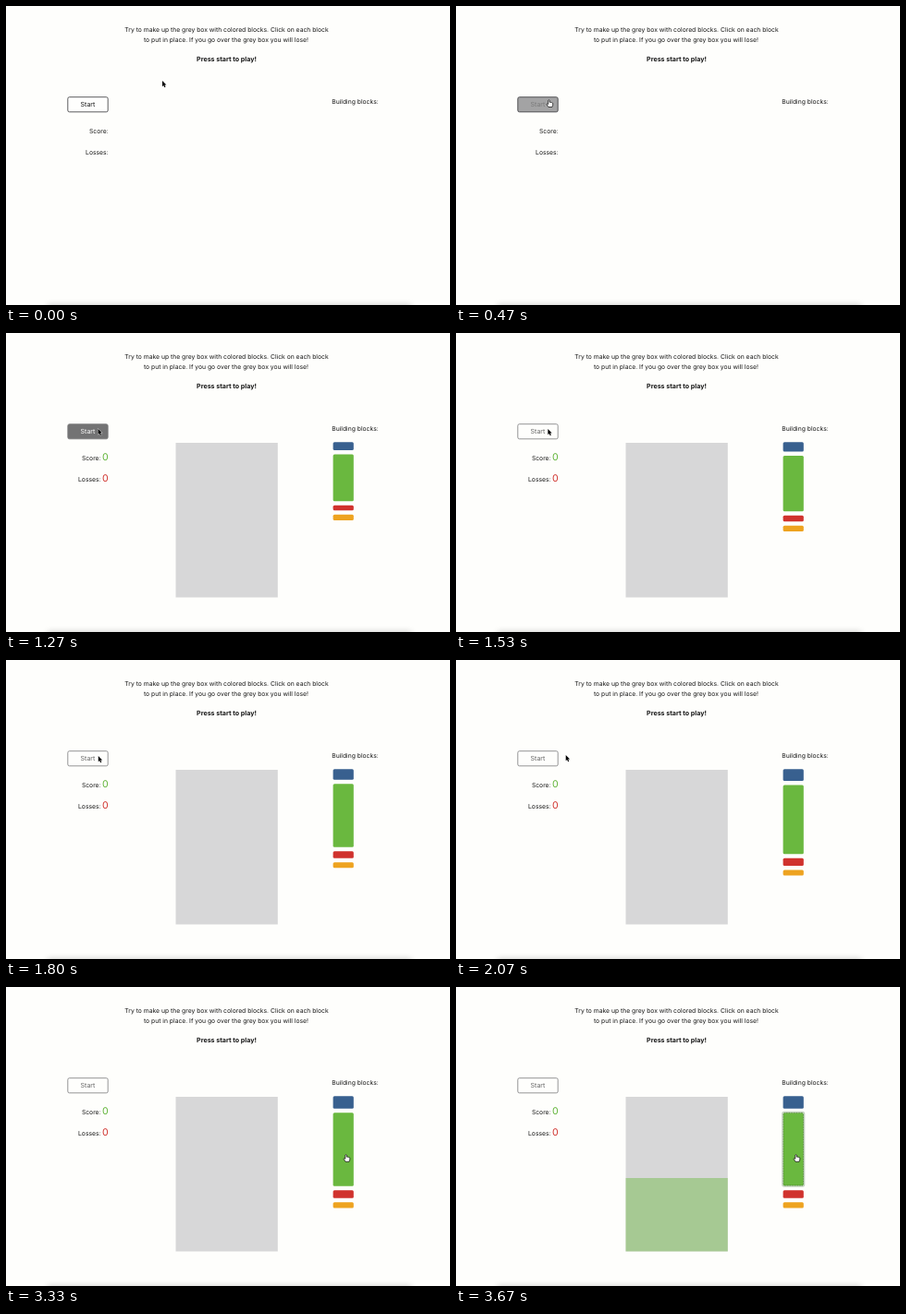
Recreate the animation shown at these times as an HTML page. Size 480 by 324 pixels, loop 3.99 s.

```html
<!DOCTYPE html>
<html lang="en">
<head>
<meta charset="utf-8">
<title>Building blocks</title>
<style>
  html, body { margin: 0; width: 100%; height: 100%; overflow: hidden; background: #fefefc; }
  svg { display: block; width: 100%; height: 100%; }
  text { font: 6.77px Inter, Roboto, sans-serif; fill: #151515; text-rendering: geometricPrecision; }
  .middle { text-anchor: middle; }
  .end { text-anchor: end; }
  .title { font-size: 7.1px; font-weight: 700; }
  .digit { font-size: 10.6px; }
</style>
</head>
<body>
<svg viewBox="0 0 480 324">
  <defs>
    <filter id="soft" x="-10%" y="-150%" width="120%" height="400%"><feGaussianBlur stdDeviation="3"/></filter>
  </defs>
  <rect width="480" height="324" fill="#fefefc"/>
  <rect x="45" y="323" width="393" height="10" fill="#000" opacity=".16" filter="url(#soft)"/>

  <text class="middle" x="238.5" y="28.4">Try to make up the grey box with colored blocks. Click on each block</text>
  <text class="middle" x="238" y="38.9">to put in place. If you go over the grey box you will lose!</text>
  <text class="middle title" x="238.5" y="60.1">Press start to play!</text>
  <text class="end" x="402.7" y="105.9">Building blocks:</text>

  <g id="button">
    <rect id="ring" x="65.7" y="97.6" width="45.6" height="18.3" rx="2.6" fill="none" stroke="#b3b3b8" stroke-width="1.6"/>
    <rect id="face" x="66.8" y="98.7" width="43.4" height="16.1" rx="1.8" stroke="#343438" stroke-width=".8"/>
    <text id="label" class="middle" x="88.5" y="109" style="font-size:7px">Start</text>
  </g>
  <text id="score" class="end" y="137.7">Score:</text>
  <text id="losses" class="end" y="160.6">Losses:</text>

  <g id="game">
    <text class="digit end" x="110.6" y="138" style="fill:#5fb336">0</text>
    <text class="digit end" x="110.6" y="161" style="fill:#d0322d">0</text>
    <rect x="183.5" y="119" width="110.3" height="167.5" fill="#d7d7d8"/>
    <rect id="placed" x="183.5" y="207" width="110.3" height="79.5" fill="#6ab83f"/>
    <g id="blocks"></g>
    <g id="focus" fill="none">
      <rect x="352.9" y="135.4" width="23.6" height="80.6" rx="2" stroke="#c4d3c0" stroke-width="1.5"/>
      <rect x="353.9" y="136.4" width="21.6" height="78.6" rx="1.5" stroke="#2f5a1c" stroke-width=".6" stroke-dasharray=".8 .8"/>
    </g>
  </g>

  <g id="arrow" stroke-linejoin="round">
    <path d="M0 0V6.2L1.4 4.9L2.4 7.2L3.5 6.7L2.5 4.5H4.4Z" fill="#000" stroke="#fff" stroke-width=".8" paint-order="stroke"/>
  </g>
  <g id="hand" stroke-linejoin="round">
    <path d="M-.8 .6Q0 -.4 .7 .6V2.6Q1.5 2.1 2 2.8Q2.8 2.4 3.2 3.2Q4.2 3 4.2 4V5.6L3.4 7.8H-.6L-2.5 4.9Q-2.4 3.8 -1.4 4.3L-.8 4.8Z" fill="#fff" stroke="#111" stroke-width=".75"/>
  </g>
</svg>
<script>
const LOOP = 3990, STEP = 200 / 3;
const $ = id => document.getElementById(id);
const show = (id, on) => $(id).setAttribute("visibility", on ? "inherit" : "hidden");
const mix = (a, b, k) => `rgb(${a.map((v, i) => Math.round(v + (b[i] - v) * k))})`;

// Steps at which the game state changes
const PRESS = 17, BEGIN = 19, GROWN = 36, PICK = 52;

const cursorPath = [
  [0, 169, 81], [2, 158, 85], [5, 118, 98], [7, 100.5, 101.7], [9, 100, 103.5],
  [18, 100, 103.5], [20, 99, 104], [29, 100, 104], [31, 118.7, 103], [32, 157, 110],
  [34, 262, 157], [36, 320, 179.5], [41, 320, 179.5], [42, 323.5, 178.5],
  [45, 345, 180], [49, 365, 181.5], [50, 367.6, 181.5]
];
const buttonFill = [[5, 0], [6, .06], [7, .43], [9, .95], [10, 1], [BEGIN, 1], [22, 0]];

// Linear interpolation through [step, ...values] keys
function follow(keys, step) {
  const next = keys.findIndex(key => key[0] > step);
  if (next === 0) return keys[0].slice(1);
  if (next < 0) return keys[keys.length - 1].slice(1);
  const a = keys[next - 1], b = keys[next];
  const k = (step - a[0]) / (b[0] - a[0]);
  return a.slice(1).map((v, i) => v + (b[i + 1] - v) * k);
}

const blocks = [
  { color: "#38608f", height: 13.4 },
  { color: "#6ab83f", height: 79.5 },
  { color: "#d0322d", height: 8.5 },
  { color: "#eea320", height: 6.2, fixed: true }
].map(block => {
  const node = document.createElementNS("http://www.w3.org/2000/svg", "rect");
  for (const [name, value] of Object.entries({ x: 353.6, width: 22.2, rx: 1.5, fill: block.color }))
    node.setAttribute(name, value);
  $("blocks").append(node);
  return { ...block, node };
});

function stackBlocks(step) {
  const left = Math.max(0, Math.min(1, (GROWN - step) / (GROWN - BEGIN)));
  const scale = 1 - .36 * left ** 1.5;
  let y = 118.3;
  for (const { node, height, fixed } of blocks) {
    const h = fixed ? height : height * scale;
    node.setAttribute("y", y);
    node.setAttribute("height", h);
    y += h + 4.5;
  }
}

function paintButton(step) {
  const [dark] = follow(buttonFill, step);
  $("face").setAttribute("fill", mix([254, 254, 253], [42, 42, 45], dark));
  $("label").style.fill = mix([21, 21, 21], [255, 255, 255], dark);
  $("button").setAttribute("opacity", step < BEGIN ? 1 : .65);
  show("ring", step >= PRESS && step < BEGIN);
}

function moveCursor(step) {
  const [x, y] = follow(cursorPath, step);
  const pointing = step < BEGIN ? x < 110.5 : x > 353.5;
  for (const id of ["arrow", "hand"]) $(id).setAttribute("transform", `translate(${x} ${y})`);
  show("arrow", !pointing);
  show("hand", pointing);
}

function draw(time) {
  const step = Math.floor((time + 3.4) / STEP);
  const playing = step >= BEGIN;
  paintButton(step);
  show("game", playing);
  for (const id of ["score", "losses"]) $(id).setAttribute("x", playing ? 102.5 : 110.6);
  stackBlocks(step);
  show("focus", step >= PICK);
  $("placed").setAttribute("opacity", .45 * Math.max(0, Math.min(1, (step - PICK) / 3)));
  moveCursor(step);
}

const start = performance.now();
function tick() {
  draw((performance.now() - start) % LOOP);
  requestAnimationFrame(tick);
}
tick();
</script>
</body>
</html>
```
